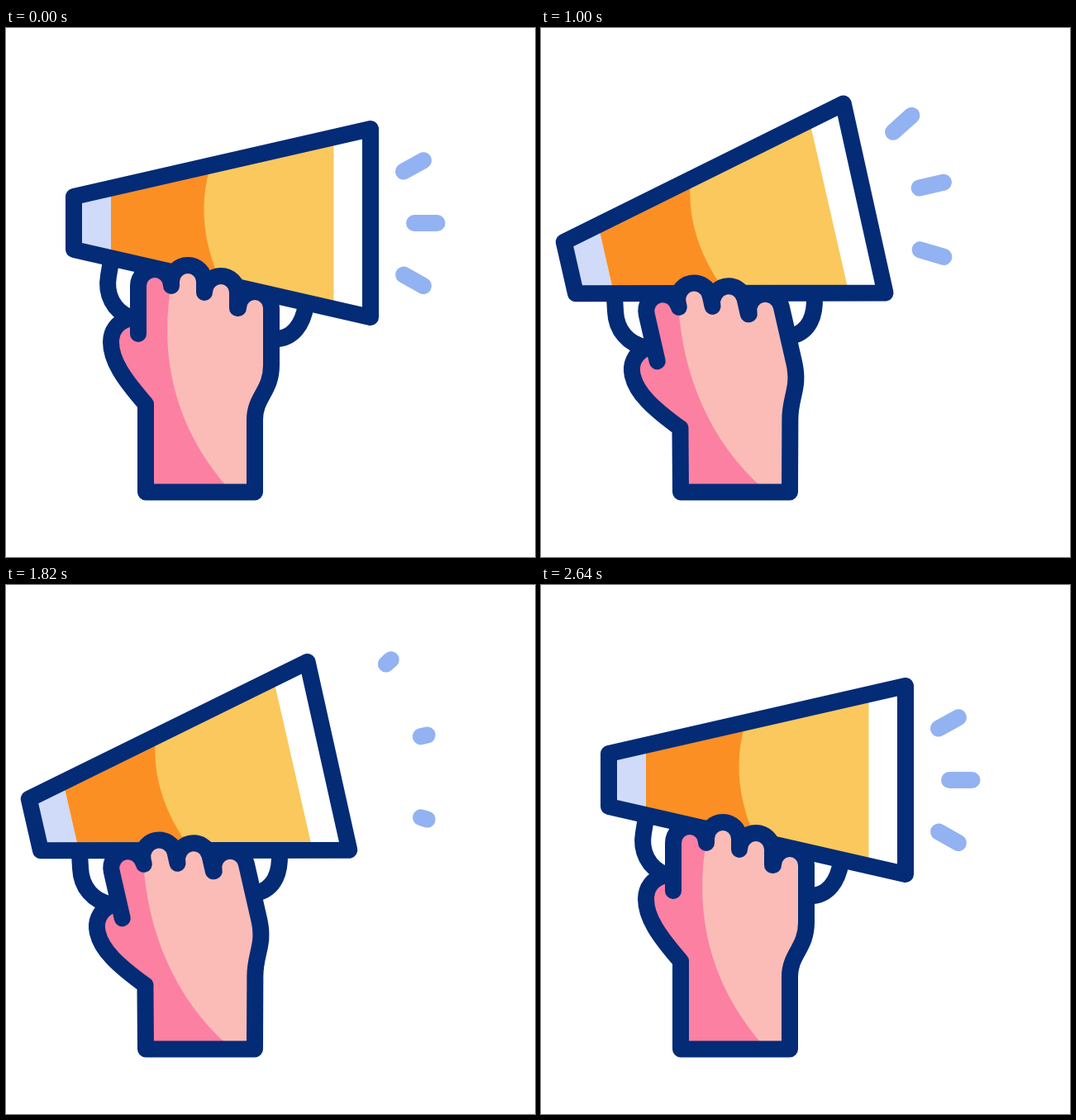
An HTML page with a canvas that plays this animation: 640x640 px, repeating every 3 s.

```html
<!DOCTYPE html>
<html lang="en">
<head>
<meta charset="utf-8">
<title>Megaphone</title>
<style>
  html, body { margin: 0; width: 100%; height: 100%; overflow: hidden; background: #fff; }
  canvas { display: block; width: 100vmin; height: 100vmin; }
</style>
</head>
<body>
<canvas id="stage" width="640" height="640"></canvas>
<script>
const ctx = document.getElementById('stage').getContext('2d');
const LOOP = 3000;
const RAD = Math.PI / 180;
const COLOR = {
  line: '#032b76', ray: '#93b2f2', rim: '#d0dbf9', orange: '#fb8f24',
  yellow: '#fac85c', pink: '#fc80a2', skin: '#fbbcb8'
};
const RAYS = [[493, 166.9, -29], [507.75, 236, 0], [493, 305.3, 29.5]];
const FINGERS = [[180, 312, 312], [220, 307, 320], [260, 320, 339], [301, 339, 339]];

const clamp = v => Math.min(1, Math.max(0, v));
const span = (t, from, to) => clamp((t - from) / (to - from));
const ease = v => v < 0.5 ? 2 * v * v : 1 - 2 * (1 - v) ** 2;
const swing = (t, from, to) => ease(span(t, from, to));
const pulse = (t, from, to) => Math.sin(Math.PI * span(t, from, to)) ** 2;

// The fist tips back around one side of the wrist and forward around the other.
function poseAt(t) {
  const degrees = -12.87 * swing(t, 220, 725)
    + 17.47 * swing(t, 1840, 2300)
    - 4.6 * swing(t, 2300, 2640);
  const angle = degrees * RAD;
  const [px, py] = degrees < 0 ? [298, 472] : [204, 467];
  const cos = Math.cos(angle), sin = Math.sin(angle);
  const at = (x, y) => [
    px + (x - px) * cos - (y - py) * sin,
    py + (x - px) * sin + (y - py) * cos
  ];
  return { angle, px, py, at };
}

function inPose(pose, draw) {
  ctx.save();
  ctx.translate(pose.px, pose.py);
  ctx.rotate(pose.angle);
  ctx.translate(-pose.px, -pose.py);
  draw();
  ctx.restore();
}

function outline(path) {
  ctx.strokeStyle = COLOR.line;
  ctx.stroke(path);
}

function drawHandle() {
  outline(new Path2D('M127 282L124 300C120 322 130 342 150 350M363 335C359 358 348 376 325 376.5'));
}

function drawMegaphone(t) {
  const flare = 1.3 * (pulse(t, 760, 1440) + pulse(t, 1330, 2030));
  const body = new Path2D();
  body.moveTo(82, 204);
  body.lineTo(441 + 7.5 * flare, 122 - 5.5 * flare);
  body.lineTo(441 + 6 * flare, 350 + 0.7 * flare);
  body.lineTo(82, 268);
  body.closePath();

  ctx.fillStyle = '#fff';
  ctx.fill(body);
  ctx.save();
  ctx.clip(body);
  ctx.fillStyle = COLOR.rim;
  ctx.fillRect(72, 100, 55, 270);
  ctx.fillStyle = COLOR.orange;
  ctx.fillRect(127, 100, 160, 270);
  const edge = 396.5 + 7.5 * flare;
  ctx.fillStyle = COLOR.yellow;
  ctx.fill(new Path2D(`M246.5 170Q228.5 232 256.5 300L280 370H${edge}V100H246.5Z`));
  ctx.restore();
  outline(body);
}

function rayState(t) {
  const full = 27.5;
  if (t < 400) {
    const length = full * (1 - swing(t, 220, 400));
    return { shift: (full - length) / 2, length };
  }
  if (t > 2330) {
    const length = full * swing(t, 2330, 2640);
    return { shift: (length - full) / 2, length };
  }
  for (const [from, to] of [[780, 1300], [1372, 1862]]) {
    if (t > from && t < to) {
      const u = span(t, from, to);
      const arc = Math.sin(Math.PI * u);
      return { shift: -13 + 75.5 * u + 4 * arc, length: 31 * arc };
    }
  }
  return null;
}

function drawRays(t) {
  const state = rayState(t);
  if (!state || state.length <= 0) return;
  ctx.strokeStyle = COLOR.ray;
  for (const [x, y, degrees] of RAYS) {
    const cos = Math.cos(degrees * RAD), sin = Math.sin(degrees * RAD);
    const near = state.shift - state.length / 2;
    const far = state.shift + state.length / 2;
    ctx.beginPath();
    ctx.moveTo(x + near * cos, y + near * sin);
    ctx.lineTo(x + far * cos, y + far * sin);
    ctx.stroke();
  }
}

function drawHand({ angle, at }) {
  const hand = new Path2D();
  const line = (x, y) => hand.lineTo(...at(x, y));
  hand.moveTo(169, 561.5);
  line(169, 455);
  hand.bezierCurveTo(...at(142, 424), ...at(127, 402), ...at(127, 380));
  hand.bezierCurveTo(...at(127, 366), ...at(135, 356), ...at(148, 352));
  line(160, 349);
  line(160, 370);
  for (const [x, y, gap] of FINGERS) {
    hand.arc(...at(x, y), 20, Math.PI + angle, 2 * Math.PI + angle);
    line(x + 20, gap);
  }
  line(321, 408);
  const [wristX, wristY] = at(301, 474);
  hand.bezierCurveTo(...at(321, 440), wristX, wristY - 28, wristX, wristY);
  hand.lineTo(301, 561.5);
  hand.closePath();

  ctx.fillStyle = COLOR.pink;
  ctx.fill(hand);
  ctx.save();
  ctx.clip(hand);
  ctx.beginPath();
  ctx.moveTo(...at(200, 270));
  ctx.lineTo(...at(200, 310));
  ctx.bezierCurveTo(...at(186, 390), ...at(200, 480), 270, 558);
  ctx.lineTo(360, 558);
  ctx.lineTo(...at(360, 270));
  ctx.closePath();
  ctx.fillStyle = COLOR.skin;
  ctx.fill();
  ctx.restore();
  outline(hand);
}

function render(t) {
  ctx.fillStyle = '#fff';
  ctx.fillRect(0, 0, 640, 640);
  ctx.lineWidth = 20;
  ctx.lineCap = ctx.lineJoin = 'round';
  const pose = poseAt(t);
  inPose(pose, () => {
    drawHandle();
    drawMegaphone(t);
    drawRays(t);
  });
  drawHand(pose);
}

const start = performance.now();
function tick() {
  render((performance.now() - start) % LOOP);
  requestAnimationFrame(tick);
}
tick();
</script>
</body>
</html>
```
